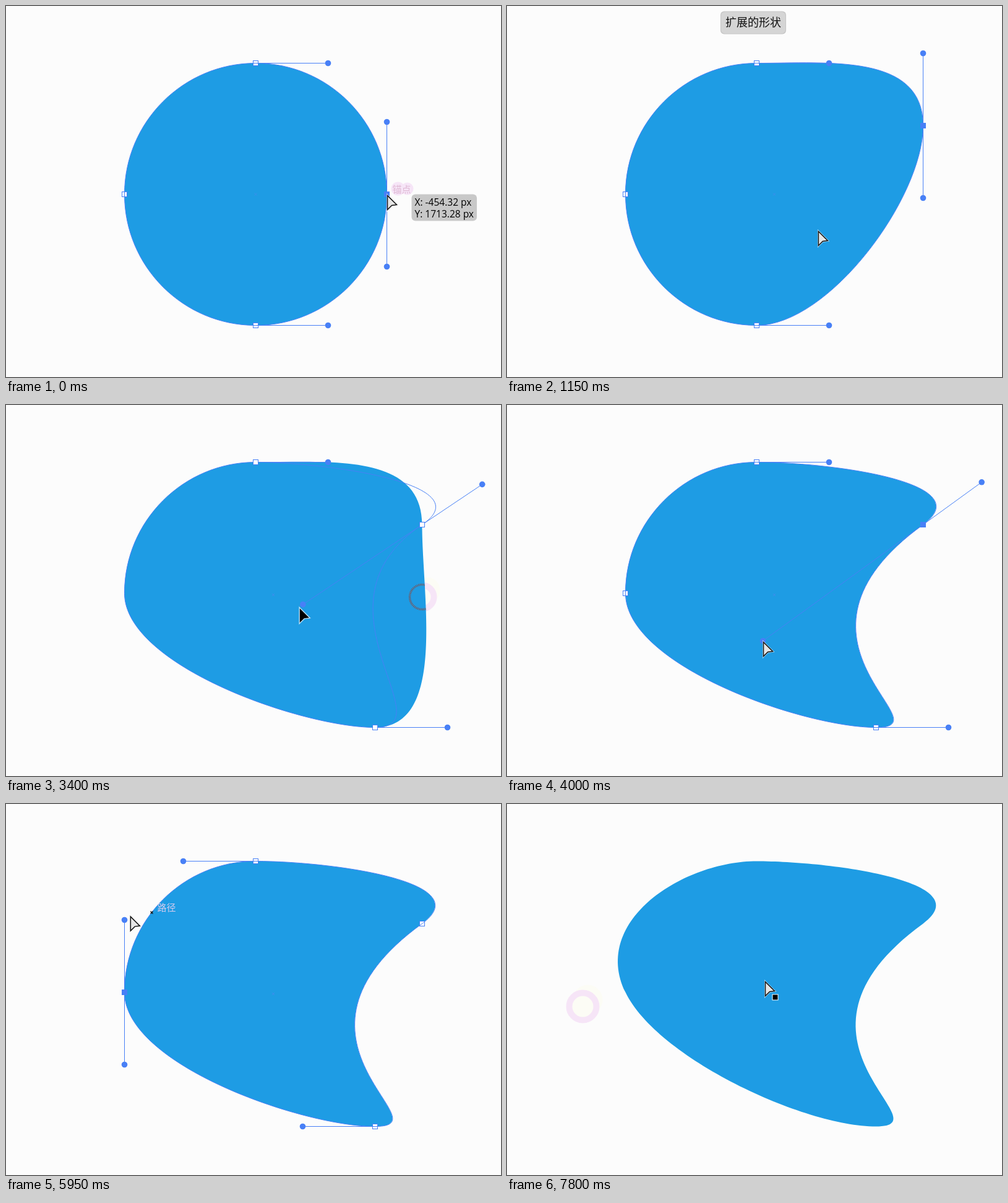
Recreate the animation shown at these times as an HTML page with a canvas. Size 800 by 600 pixels, loop 7.85 s.

```html
<!DOCTYPE html>
<html lang="zh">
<head>
<meta charset="utf-8">
<title>Path editing</title>
<style>
html, body { margin: 0; width: 100%; height: 100%; overflow: hidden; background: #fcfcfc; }
canvas { display: block; width: 800px; height: 600px; }
</style>
</head>
<body>
<canvas id="stage" width="800" height="600"></canvas>
<script>
const g = document.getElementById('stage').getContext('2d');
const LOOP = 7850, STEP = 50, SCALE = 1.0341, SNAP = 4.5, LEAD = 18;
const CX = 403, CY = 304, R = 212, K = 117;
const BLUE = '#4880f6', FILL = '#1e9ce4', BG = '#fcfcfc', PINK = '#f6e5f7', INK = '#111';
const CJK = '"Noto Sans CJK SC", "Noto Sans CJK", sans-serif';

// The pointer leaves at `go`, reaches `p` at `at`, presses from `down` to `up`, dragging to `to`.
// Anchors: top 0, right 1, bottom 2, left 3.
const moveRight = { go: 0, at: 0, p: [CX + R, CY], down: 50, up: 700, to: [672, 193], sel: 1, tip: true };
const moveBottom = { go: 850, at: 1400, p: [CX, CY + R], bow: .055, down: 1715, up: 2250, to: [596, 521], sel: 2, tip: true };
const bendRight = { go: 2550, at: 3050, p: [672, 310], down: 3100, up: 4000, to: [413, 381], bend: .182, sel: 1 };
const bendLeft = { go: 5800, at: 6050, p: [CX - R, CY - K], down: 6200, up: 7000, to: [135, 187], sel: 3 };
const steps = [
  moveRight,
  moveBottom,
  bendRight,
  { go: 4150, at: 4400, p: [770, 310], down: 4600, up: 4650, sel: 2 },
  { go: 4850, at: 5350, p: [87, 302], down: 5400, up: 5550, sel: 2 },
  { go: 5550, at: 5650, p: [CX - R, CY], down: 5650, up: 5700, sel: 3 },
  { go: 5700, at: 5800, p: [216, 166] },
  bendLeft,
  { go: 7200, at: 7250, p: [122, 327], down: 7250, up: LOOP, sel: -1 },
  { go: 7400, at: 7650, p: [416, 285] }
];
const hints = [
  { text: '锚点', p: moveRight.p, from: 0, to: moveRight.down },
  { text: '手柄', p: bendRight.to, from: 4050, to: 4850 },
  { text: '路径', p: [235, 175], from: 5800, to: 6000 }
];

const clamp = v => Math.min(1, Math.max(0, v));
const smooth = u => u * u * (3 - 2 * u);
const easeOut = u => 1 - (1 - u) ** 3;

// Point at share k of the way, pushed sideways by `bow`
function along([ax, ay], [bx, by], k, bow = 0) {
  const dx = bx - ax, dy = by - ay, side = bow * Math.sin(Math.PI * k);
  return [ax + dx * k - dy * side, ay + dy * k + dx * side];
}

function dragged(s, t) {
  const [x, y] = along(s.p, s.to, easeOut(clamp((t - s.down) / (s.up - s.down))), s.bend);
  return [x, Math.abs(y - s.p[1]) < SNAP ? s.p[1] : y];
}

function pointer(t) {
  const i = steps.findLastIndex(s => s.go <= t), s = steps[i];
  if (s.to && t >= s.down) return dragged(s, t + LEAD);
  const last = steps[Math.max(0, i - 1)];
  const k = s.at > s.go ? smooth(clamp((t - s.go) / (s.at - s.go))) : 1;
  return along(last.to || last.p, s.p, k, s.bow);
}

function opposite([ax, ay], [hx, hy]) {
  const k = K / Math.hypot(hx - ax, hy - ay);
  return [ax - (hx - ax) * k, ay - (hy - ay) * k];
}

function shapeAt(t) {
  const top = [CX, CY - R], left = [CX - R, CY];
  const right = dragged(moveRight, t), bottom = dragged(moveBottom, t);
  const rOut = t < bendRight.down ? [right[0], right[1] + K] : dragged(bendRight, t);
  const lOut = dragged(bendLeft, t);
  const bIn = [bottom[0] + K, bottom[1]], tOut = [CX + K, CY - R];
  return [
    { p: top, in: opposite(top, tOut), out: tOut },
    { p: right, in: opposite(right, rOut), out: rOut },
    { p: bottom, in: bIn, out: opposite(bottom, bIn) },
    { p: left, in: opposite(left, lOut), out: lOut }
  ];
}

function trace(shape) {
  g.beginPath();
  g.moveTo(...shape[0].p);
  shape.forEach((a, i) => {
    const b = shape[(i + 1) % 4];
    g.bezierCurveTo(...a.out, ...b.in, ...b.p);
  });
  g.closePath();
}

function line(a, b) {
  g.beginPath();
  g.moveTo(...a);
  g.lineTo(...b);
  g.stroke();
}

function circle(x, y, r) {
  g.beginPath();
  g.arc(x, y, r, 0, Math.PI * 2);
}

function disc(x, y, r, color) {
  g.fillStyle = color;
  circle(x, y, r);
  g.fill();
}

function pen(color, width = 1) {
  g.strokeStyle = color;
  g.lineWidth = width;
}

function cross([x, y], r) {
  line([x - r, y - r], [x + r, y + r]);
  line([x - r, y + r], [x + r, y - r]);
}

function box(x, y, w, h, color) {
  g.fillStyle = color;
  g.beginPath();
  g.roundRect(x, y, w, h, 6);
  g.fill();
}

function handle(anchor, end) {
  pen(BLUE);
  line(anchor, end);
  disc(...end, 4.8, BLUE);
}

function square(p, solid) {
  const [x, y] = p.map(Math.round);
  pen(BLUE);
  g.fillStyle = solid ? BLUE : '#fff';
  g.fillRect(x - 4, y - 4, 8, 8);
  g.strokeRect(x - 4, y - 4, 8, 8);
}

function ringUnder([x, y], r) {
  disc(x + 8, y - 11, r - 3, '#fcfcf5');
  disc(x, y, r - 5, '#fcfcf5');
  pen(PINK, 10);
  circle(x, y, r - 5);
  g.stroke();
}

function ringOver([x, y], r, shape) {
  g.save();
  trace(shape);
  g.clip();
  pen('#6c6070', 3.5);
  g.setLineDash([1.5, 1]);
  circle(x, y, r - 4);
  g.stroke();
  g.restore();
}

function drawPointer([x, y], pressed, overFill) {
  g.save();
  g.translate(x, y);
  g.beginPath();
  [[1, 2], [16, 17], [8, 18], [1, 25]].forEach(p => g.lineTo(...p));
  g.closePath();
  pen('rgba(255,255,255,.7)', 2.8);
  g.stroke();
  g.fillStyle = pressed ? '#000' : '#e6e6e6';
  g.fill();
  if (!pressed) {
    pen(INK, 1.5);
    g.stroke();
  }
  if (overFill) {
    g.fillStyle = '#fff';
    g.fillRect(12, 22, 10, 10);
    g.fillStyle = '#000';
    g.fillRect(13, 23, 8, 8);
  }
  g.restore();
}

function drawTip([x, y], from, moving) {
  const num = v => String(+v.toFixed(2));
  const row = (name, v) => `${name}: ${num(v)} px`;
  const text = moving
    ? [row('dX', (x - from[0]) * SCALE), row('dY', (y - from[1]) * SCALE)]
    : [row('X', -454.32 + (x - CX - R) * SCALE), row('Y', 1713.28 + (y - CY) * SCALE)];
  g.font = '15.5px "Open Sans", "Noto Sans", sans-serif';
  const w = Math.max(...text.map(s => g.measureText(s).width)) + 10;
  box(x + 40, y, w, 43, '#c8c8c8');
  g.fillStyle = '#000';
  text.forEach((s, k) => g.fillText(s, x + 45, y + 18 + k * 19));
}

function drawHint({ text, p: [x, y] }, inside) {
  g.font = `15px ${CJK}`;
  if (inside) {
    pen(INK, 1.2);
    cross([x, y], 2);
  } else {
    disc(x + 18, y - 9, 11, PINK);
    disc(x + 33, y - 9, 10, PINK);
  }
  g.fillStyle = inside ? '#d3cbee' : '#dfb9d4';
  g.fillText(text, x + 9, y - 3);
}

function drawToast() {
  box(344.5, 8, 106, 37, '#c5c5c5');
  box(345.5, 9, 104, 35, '#d5d5d5');
  g.fillStyle = INK;
  g.font = `18px ${CJK}`;
  g.fillText('扩展的形状', 352.5, 32.5);
}

function drawSelection(live, sel, dragging) {
  const prev = (sel + 3) % 4, next = (sel + 1) % 4, near = [prev, sel, next];
  const xs = live.map(a => a.p[0]), ys = live.map(a => a.p[1]);
  pen('#3f8cec');
  cross([(Math.min(...xs) + Math.max(...xs)) / 2, (Math.min(...ys) + Math.max(...ys)) / 2], 2);
  if (!dragging) live.forEach((a, i) => square(a.p, i === sel));
  trace(live);
  pen(BLUE);
  g.stroke();
  handle(live[sel].p, live[sel].in);
  handle(live[sel].p, live[sel].out);
  handle(live[prev].p, live[prev].out);
  handle(live[next].p, live[next].in);
  if (dragging) near.forEach(i => square(live[i].p));
}

function draw(t) {
  const press = steps.find(s => t >= s.down && t < s.up);
  const drag = press && press.to ? press : null;
  const live = shapeAt(t), base = drag ? shapeAt(drag.down) : live;
  const chosen = steps.findLast(s => s.down <= t) || moveRight;
  const ringSize = drag ? 24 : 27;

  g.setTransform(1, 0, 0, 1, 0, 0);
  g.fillStyle = BG;
  g.fillRect(0, 0, 800, 600);
  g.translate(.5, .5);

  if (press) ringUnder(press.p, ringSize);
  if (drag === moveBottom && live[2].p[1] === drag.p[1]) {
    const y = drag.p[1], x = CX - R;
    g.fillStyle = PINK;
    g.fillRect(x, y - 3, 2 * R, 4);
    pen('#b59bb8');
    line([x, y], live[2].p);
  }

  trace(base);
  g.fillStyle = FILL;
  g.fill();
  if (press) ringOver(press.p, ringSize, base);
  if (chosen.sel >= 0) drawSelection(live, chosen.sel, drag);

  hints.filter(h => t >= h.from && t < h.to).forEach(h => drawHint(h, h.from > 0));
  const tip = steps.find((s, i) => s.tip && t >= s.at && t < steps[i + 1].go);
  if (tip) drawTip(live[tip.sel].p, tip.p, drag);
  if (t >= moveRight.up && t < moveBottom.up) drawToast();
  drawPointer(pointer(t), drag, t >= steps.at(-1).go);
}

const start = performance.now();
function tick(now) {
  const t = Math.max(0, now - start) % LOOP;
  draw(Math.floor(t / STEP) * STEP);
  requestAnimationFrame(tick);
}
draw(0);
requestAnimationFrame(tick);
</script>
</body>
</html>
```
